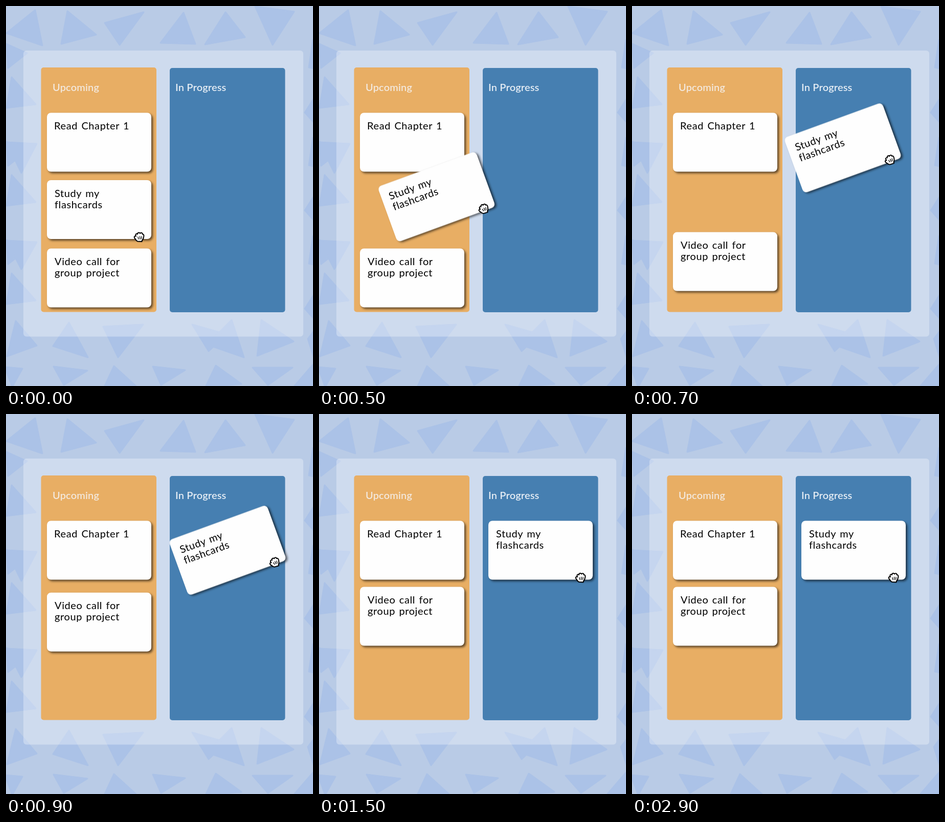
Animation, 600 px wide and 742 px high, one loop 3.1 s. Source, as an HTML page:

```html
<!DOCTYPE html>
<html lang="en">
<head>
<meta charset="utf-8">
<title>Study board</title>
<style>
  html, body { margin: 0; width: 100%; height: 100%; overflow: hidden; background: #b9cbe6; }
  svg { display: block; width: 600px; height: 742px; font-family: Lato, "Open Sans", sans-serif; font-size: 20px; }
  .tri { fill: #abc2e7; stroke: #abc2e7; stroke-width: 3; stroke-linejoin: round; }
  .head { font-weight: 600; letter-spacing: .15px; }
  .card rect { fill: #fefefe; filter: drop-shadow(3px 3px 2px rgba(0, 0, 0, .6)); }
  .card text { letter-spacing: .6px; word-spacing: 1.7px; }
  .hand { fill: #fff; stroke: #000; stroke-width: 2; stroke-linejoin: round; stroke-linecap: round; }
</style>
</head>
<body>
<svg viewBox="0 0 600 742">
  <defs>
    <g id="left">
      <path d="M1 74L41 92 4 121zM11 139L58 192 1 199zM600 66L592 120 602 122zM602 180L584 208 602 228z"/>
    </g>
  </defs>
  <rect width="600" height="742" fill="#b9cbe6"/>
  <g class="tri">
    <path d="M57 8L71 77 1 53zM120 10L176 56 108 74zM193 33L269 12 222 76z"/>
    <path d="M347 13L370 74 302 72zM429 12L467 61 389 75zM487 1L563 11 521 76z"/>
    <use href="#left"/>
    <use href="#left" y="191"/>
    <use href="#left" y="383"/>
    <path d="M1 266L60 269 30 326zM1 458L60 461 30 514z"/>
    <path d="M19 615L60 663 2 684zM123 618L160 686 92 664zM190 626L268 622 219 686z"/>
    <path d="M364 622L431 641 396 674zM441 613L465 686 393 661zM499 613L562 655 491 683zM602 634L590 650 602 688z"/>
    <path d="M-2 705L32 708 12 744zM93 704L159 712 113 740zM211 703L256 744 192 744z"/>
    <path d="M287 704L350 711 303 740zM410 702L460 738 390 744zM482 706L560 706 512 740zM600 700L602 744 562 744z"/>
  </g>
  <rect x="34" y="87" width="547" height="558.5" rx="6" fill="#fff" fill-opacity=".3"/>
  <rect x="68.5" y="120" width="225.5" height="477.5" rx="5" fill="#e8ae64"/>
  <rect x="320" y="121" width="225.5" height="477" rx="5" fill="#467fb1"/>
  <text class="head" x="91" y="166" fill="#f3e8dc">Upcoming</text>
  <text class="head" x="331" y="166" fill="#e4ecf4">In Progress</text>

  <g class="card" transform="translate(182 266)">
    <rect x="-102" y="-57.5" width="204" height="115" rx="8"/>
    <text x="-88" y="-25">Read Chapter 1</text>
  </g>
  <g class="card" id="call">
    <rect x="-102" y="-57.5" width="204" height="115" rx="8"/>
    <text x="-87" y="-25">Video call for</text>
    <text x="-87" y="-3">group project</text>
  </g>
  <g class="card" id="study">
    <rect x="-102" y="-57.5" width="204" height="115" rx="8"/>
    <text x="-87" y="-25">Study my</text>
    <text x="-87" y="-3">flashcards</text>
    <g class="hand" transform="translate(78 53.5)">
      <path d="M-5 7C-7 5 -8 3 -9 1.500C-10 -1 -8 -2.500 -6 -1.500C-8 -5 -5 -7.500 -3 -5.500C-3 -9 1 -9.500 2 -7C4 -9.500 7 -8 6.500 -5.500C9 -6 10 -3 9 0C8.500 3 8 5 6 6.500L5.500 9L-3 8.500z"/>
      <path d="M-2 0L-1 4M1.500 -1L2 4M5 -1L4.500 3.500" stroke-width="1.300"/>
    </g>
  </g>
</svg>
<script>
  const LOOP = 3100, STEP = 100;
  const study = document.getElementById('study');
  const call = document.getElementById('call');

  const ease = u => u < .5 ? 4 * u ** 3 : 1 - 4 * (1 - u) ** 3;
  const tween = (t, start, end) => ease(Math.min(1, Math.max(0, (t - start) / (end - start))));
  const mix = (a, b, p) => a + (b - a) * p;

  function draw(t) {
    const move = tween(t, 300, 852);
    const tilt = -20 * (tween(t, 0, 350) - tween(t, 900, 1100));
    const x = mix(182, 433, move), y = mix(397.5, 266, move);
    study.setAttribute('transform', `translate(${x} ${y}) rotate(${tilt})`);
    call.setAttribute('transform', `translate(182 ${mix(531, 395, tween(t, 470, 1062))})`);
  }

  // The motion advances ten times a second.
  const start = performance.now();
  function tick() {
    const t = (performance.now() - start) % LOOP;
    draw(Math.floor(t / STEP) * STEP);
    requestAnimationFrame(tick);
  }
  tick();
</script>
</body>
</html>
```
